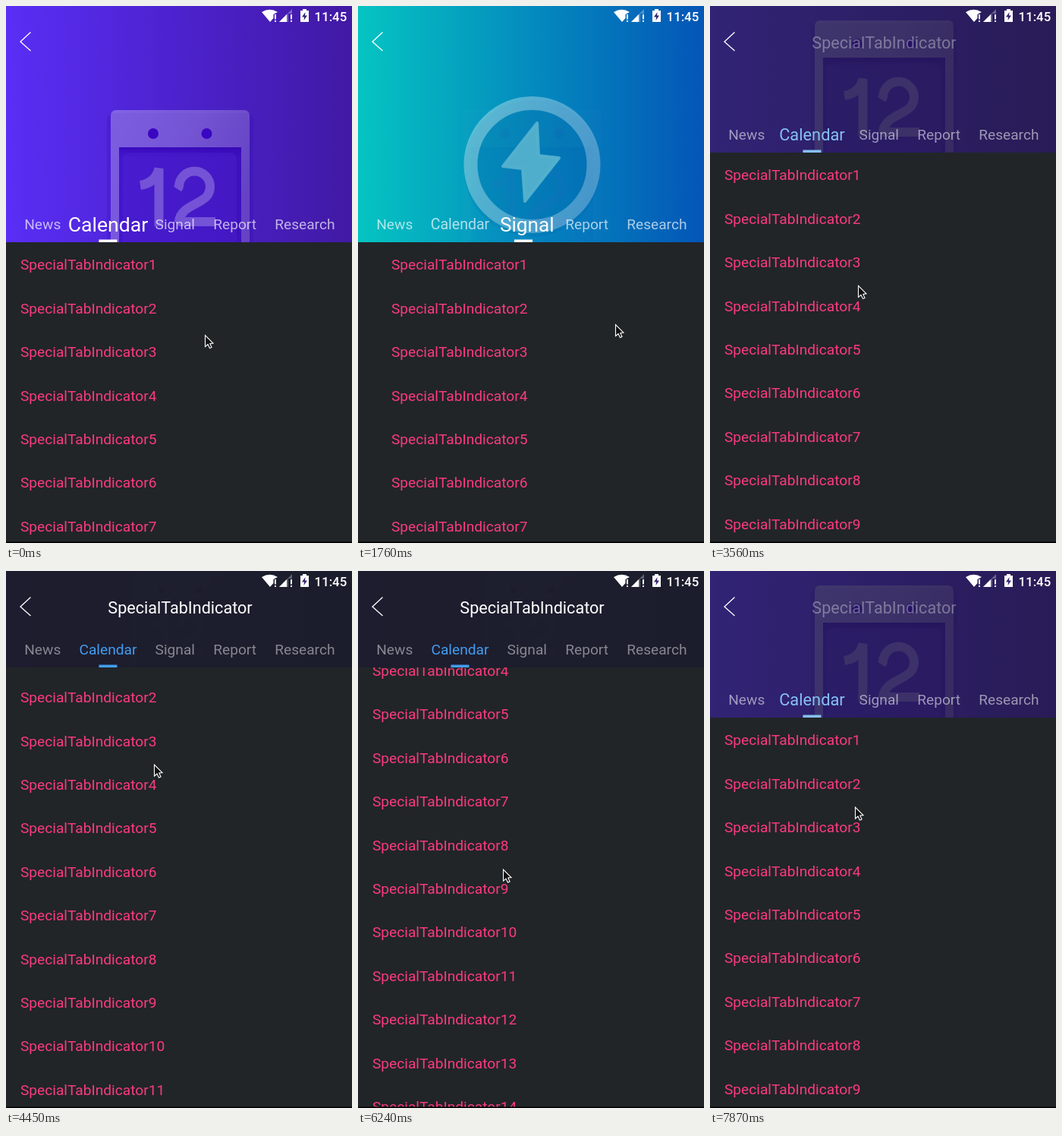
An HTML page with a canvas for the animation above (8 s loop, 456 px wide and 707 px high).

```html
<!DOCTYPE html>
<html lang="en">
<head>
<meta charset="utf-8">
<title>Tab indicator</title>
<style>
html, body { margin: 0; width: 100%; height: 100%; overflow: hidden; background: #212528; }
canvas { display: block; width: 456px; height: 707px; }
</style>
</head>
<body>
<canvas id="stage"></canvas>
<script>
const W = 456, HEIGHT = 707, LOOP = 8000;
const OPEN = 311, CLOSED = 127, ROW = 57.4;
const FONT_SIZE = 19.15, TAB_GAP = 24.2;
const TITLE = 'SpecialTabIndicator';
const TABS = ['News', 'Calendar', 'Signal', 'Report', 'Research'];
// Evenly spaced updates: start, end, number of intervals
const BURSTS = [[140, 2360, 15], [2810, 4450, 11], [4750, 7870, 21]];

const canvas = document.getElementById('stage');
const ctx = canvas.getContext('2d');
const ratio = window.devicePixelRatio || 1;
canvas.width = W * ratio;
canvas.height = HEIGHT * ratio;

const lerp = (a, b, k) => a + (b - a) * k;
const clamp = v => Math.max(0, Math.min(1, v));
const ramp = (t, from, to) => clamp((t - from) / (to - from));

function ease(t, from, to) {
  const k = ramp(t, from, to);
  return k * k * (3 - 2 * k);
}

function heldTime(t) {
  let held = 0;
  for (const [start, end, count] of BURSTS) {
    if (t < start) break;
    const step = (end - start) / count;
    held = start + Math.min(count, Math.floor((t - start + 9) / step)) * step;
  }
  return held;
}

const pageAt = t => 1 + ease(t, 440, 1030) - ease(t, 1670, 2360);

// Drag up, fling up, fling back down, pull the header open
const scrollAt = t => 231.5 * ramp(t, 2745, 4450) ** .905 + 300 * ease(t, 5050, 5790)
  - 347.5 * ease(t, 5790, 6771) - 65.5 * ease(t, 7280, 7870);

// While dragging, the pointer moves with the content; between drags it returns
function pointerAt(t) {
  return {
    x: 262 - 112 * ease(t, 140, 740) + 197 * ease(t, 740, 1910) - 152 * ease(t, 1910, 2360)
      + 20 * ease(t, 4450, 4900) - 24 * ease(t, 5050, 5790),
    y: 433 - 14 * ease(t, 740, 1768) + 67 * ease(t, 1910, 2360) + 288 * ease(t, 4450, 5050)
      - 345 * ease(t, 6771, 7280) - scrollAt(t)
  };
}

function text(str, x, y, size, color, align = 'left', weight = 400) {
  ctx.font = `${weight} ${size}px Roboto, sans-serif`;
  ctx.textAlign = align;
  ctx.fillStyle = color;
  ctx.fillText(str, x, y);
}

function polygon(points, fill) {
  ctx.beginPath();
  points.forEach(([x, y]) => ctx.lineTo(x, y));
  ctx.closePath();
  ctx.fillStyle = fill;
  ctx.fill();
}

function stroke(width, color, join = 'miter') {
  ctx.lineWidth = width;
  ctx.strokeStyle = color;
  ctx.lineJoin = join;
  ctx.stroke();
}

function rect(x, y, w, h, fill) {
  ctx.fillStyle = fill;
  ctx.fillRect(x, y, w, h);
}

function roundRect(x, y, w, h, r, fill) {
  ctx.beginPath();
  ctx.roundRect(x, y, w, h, r);
  ctx.fillStyle = fill;
  ctx.fill();
}

function disc(x, y, r, fill) {
  ctx.beginPath();
  ctx.arc(x, y, r, 0, Math.PI * 2);
  ctx.fillStyle = fill;
  ctx.fill();
}

function sweep(x0, y0, x1, y1, ...colors) {
  const g = ctx.createLinearGradient(x0, y0, x1, y1);
  colors.forEach((c, i) => g.addColorStop(i / (colors.length - 1), c));
  return g;
}

function dateDigits() {
  ctx.beginPath();
  ctx.moveTo(177, 236);
  ctx.quadraticCurveTo(197, 233, 201.5, 214);
  ctx.lineTo(201.5, 290);
  ctx.moveTo(226, 241);
  ctx.arc(248.5, 238, 20.5, Math.PI, Math.PI * 2.2);
  ctx.bezierCurveTo(257, 261, 229, 264, 228, 284);
  ctx.lineTo(276, 284);
  stroke(12, '#7453d6', 'bevel');
}

function calendarIcon() {
  roundRect(133, 141, 193, 200, 9, 'rgba(45,0,170,.18)');
  ctx.beginPath();
  ctx.roundRect(138, 137, 183, 220, 7);
  ctx.rect(149, 186, 161, 160);
  ctx.fillStyle = sweep(138, 137, 321, 240, 'rgba(255,255,255,.28)', 'rgba(255,255,255,.25)', 'rgba(255,255,255,.18)');
  ctx.fill('evenodd');
  rect(149, 186, 161, 160, 'rgba(50,0,190,.3)');
  rect(149, 186, 161, 14, sweep(0, 186, 0, 200, 'rgba(50,0,180,.5)', 'rgba(50,0,180,0)'));
  roundRect(154, 193, 150, 160, 8, 'rgba(90,50,220,.2)');
  for (const x of [194, 264.5]) disc(x, 168, 7, '#3a06c2');
  dateDigits();
}

function signalIcon() {
  disc(229.5, 214, 90, 'rgba(0,80,150,.12)');
  disc(229.5, 209, 73, 'rgba(0,110,170,.16)');
  ctx.beginPath();
  ctx.arc(229.5, 209, 81, 0, Math.PI * 2);
  stroke(18, sweep(150, 140, 310, 280, 'rgba(255,255,255,.36)', 'rgba(255,255,255,.27)'));
  polygon([[236, 154], [191, 211], [217, 214], [220, 257], [265, 200], [238, 197]], '#55b1cf');
  stroke(4, '#55b1cf', 'round');
}

function statusBar() {
  ctx.beginPath();
  ctx.moveTo(348, 21);
  ctx.lineTo(337, 8);
  ctx.quadraticCurveTo(347.5, 1.5, 358, 8);
  ctx.lineTo(352.5, 11);
  ctx.lineTo(352.5, 16);
  ctx.fillStyle = '#fff';
  ctx.fill();
  polygon([[360, 21], [377, 4], [377, 10], [372, 10], [372, 21]], 'rgba(255,255,255,.3)');
  polygon([[360, 21], [370, 11], [370, 21]], '#fff');
  for (const x of [354, 375]) {
    rect(x, 11, 2, 6.5, '#fff');
    rect(x, 19, 2, 2, '#fff');
  }
  rect(388, 6, 11, 15, '#fff');
  rect(391, 4, 5, 2, '#fff');
  polygon([[394.5, 8], [390, 14.5], [393, 14.5], [392.5, 19], [397, 12.5], [394, 12.5]], '#33256e');
  text('11:45', 449.2, 20, 16.8, '#fff', 'right', 500);
}

function backArrow() {
  ctx.beginPath();
  ctx.moveTo(32.5, 34.5);
  ctx.lineTo(19, 47);
  ctx.lineTo(32.5, 59);
  stroke(1.3, '#fff');
}

function drawList(left, top, offset) {
  const first = Math.max(0, Math.floor(offset / ROW) - 1);
  for (let i = first; i < first + 13; i++) {
    text(TITLE + (i + 1), left + 19, top + 36.3 + i * ROW - offset, FONT_SIZE, '#fc3a7c');
  }
}

function drawBackdrop(height, fold, signal) {
  ctx.save();
  ctx.beginPath();
  ctx.rect(0, 0, W, height);
  ctx.clip();
  rect(0, 0, W, height, sweep(0, 0, W, 0, '#5a2ef5', '#4c22cd', '#4119a4'));
  ctx.globalAlpha = signal;
  rect(0, 0, W, height, sweep(0, 0, W, 0, '#00cdbf', '#0091bd', '#0059b8'));

  const scale = 1 - .3 * ramp(fold, .65, 1);
  ctx.translate(229.5, 120);
  ctx.scale(scale, scale);
  ctx.translate(-229.5, -120 + height - OPEN);
  ctx.globalAlpha = 1 - signal;
  if (signal < 1) calendarIcon();
  ctx.globalAlpha = signal;
  if (signal > 0) signalIcon();
  ctx.restore();
  rect(0, 0, W, height, `rgba(27,29,41,${fold * .97})`);
}

function drawTabs(height, fold, page) {
  const accent = [66, 157, 240].map(c => Math.round(lerp(255, c, fold)));
  const centers = [];
  let left = TAB_GAP;
  TABS.forEach((label, i) => {
    ctx.font = `${FONT_SIZE}px Roboto, sans-serif`;
    const width = ctx.measureText(label).width;
    centers.push(left + width / 2);
    left += width + TAB_GAP;

    const focus = clamp(1 - Math.abs(page - i));
    const rgb = accent.map(c => Math.round(lerp(255, c, focus)));
    const alpha = lerp(lerp(.67, .47, fold), 1, focus);
    const scale = 1 + .39 * focus * (1 - fold);
    ctx.save();
    ctx.translate(centers[i], height - 23.5);
    ctx.scale(scale, scale);
    text(label, 0, 6.7, FONT_SIZE, `rgba(${rgb},${alpha})`, 'center');
    ctx.restore();
  });
  const mark = lerp(centers[1], centers[2], page - 1);
  rect(mark - 12, height - 3.5, 24, 3.5, `rgb(${accent})`);
}

function drawPointer({ x, y }) {
  ctx.save();
  ctx.translate(x + .5, y + .5);
  polygon([[0, 0], [0, 15], [3.5, 12], [6, 17], [8.5, 16], [6.3, 11], [10.5, 10.5]], '#111');
  stroke(1.1, '#fff');
  ctx.restore();
}

function draw(now) {
  const t = heldTime(now % LOOP);
  const page = pageAt(t);
  const scroll = scrollAt(t);
  const height = Math.round(Math.max(CLOSED, OPEN - scroll));
  const fold = (OPEN - height) / (OPEN - CLOSED);
  const offset = Math.max(0, scroll - (OPEN - CLOSED));

  ctx.setTransform(ratio, 0, 0, ratio, 0, 0);
  rect(0, 0, W, HEIGHT, '#212528');
  for (const i of [1, 2]) {
    if (Math.abs(i - page) < 1) drawList((i - page) * W, height, offset);
  }
  drawBackdrop(height, fold, page - 1);
  text(TITLE, 229.5, 55.5, 21.6, `rgba(255,255,255,${ramp(fold, .45, 1)})`, 'center');
  drawTabs(height, fold, page);
  backArrow();
  statusBar();
  rect(0, 705.5, W, 1.5, '#000');
  drawPointer(pointerAt(t));
}

const began = performance.now();
function tick() {
  draw(performance.now() - began);
  requestAnimationFrame(tick);
}
tick();
</script>
</body>
</html>
```
